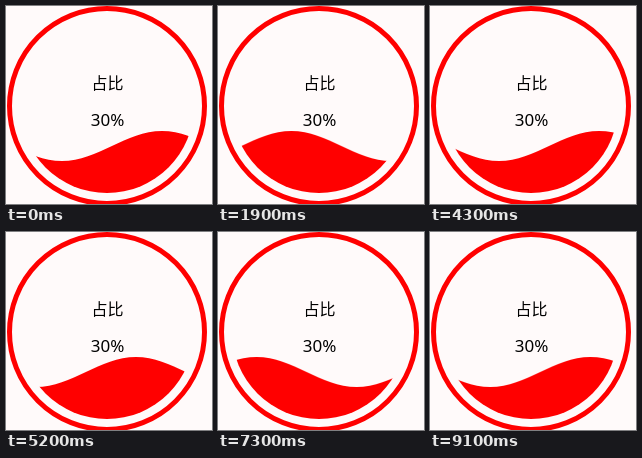
Animation of 206 by 198 pixels, one loop 9200 ms. Source, as an HTML page:

```html
<!DOCTYPE html>
<html lang="zh">
<head>
<meta charset="utf-8">
<title>占比</title>
<style>
  html, body {
    margin: 0;
    width: 100%;
    height: 100%;
    overflow: hidden;
    background: #fffafa;
  }
  svg { display: block; }
  text { text-anchor: middle; fill: #000; }
  .label { font: 16px "Noto Sans CJK SC", "Noto Sans CJK", sans-serif; }
  .value { font: 17px "Noto Sans", "Open Sans", sans-serif; }
  /* One wavelength (200px) per cycle, a new position every 100 ms */
  .wave { animation: drift 4600ms steps(46, end) infinite; }
  @keyframes drift {
    from { transform: translateX(0); }
    to { transform: translateX(-200px); }
  }
</style>
</head>
<body>
<svg width="206" height="198" viewBox="0 0 206 198">
  <defs>
    <clipPath id="bowl"><circle cx="101" cy="100" r="87"/></clipPath>
  </defs>
  <circle cx="101" cy="100" r="97.5" fill="none" stroke="#f00" stroke-width="5"/>
  <g clip-path="url(#bowl)">
    <path class="wave" fill="#f00" d="M-44 125
      C-7.6 125 19.6 155 56 155
      S119.6 125 156 125
      S219.6 155 256 155
      S319.6 125 356 125
      S419.6 155 456 155
      V200 H-44 Z"/>
  </g>
  <text class="label" x="101.5" y="83">占比</text>
  <text class="value" x="101.5" y="120">30%</text>
</svg>
</body>
</html>
```
